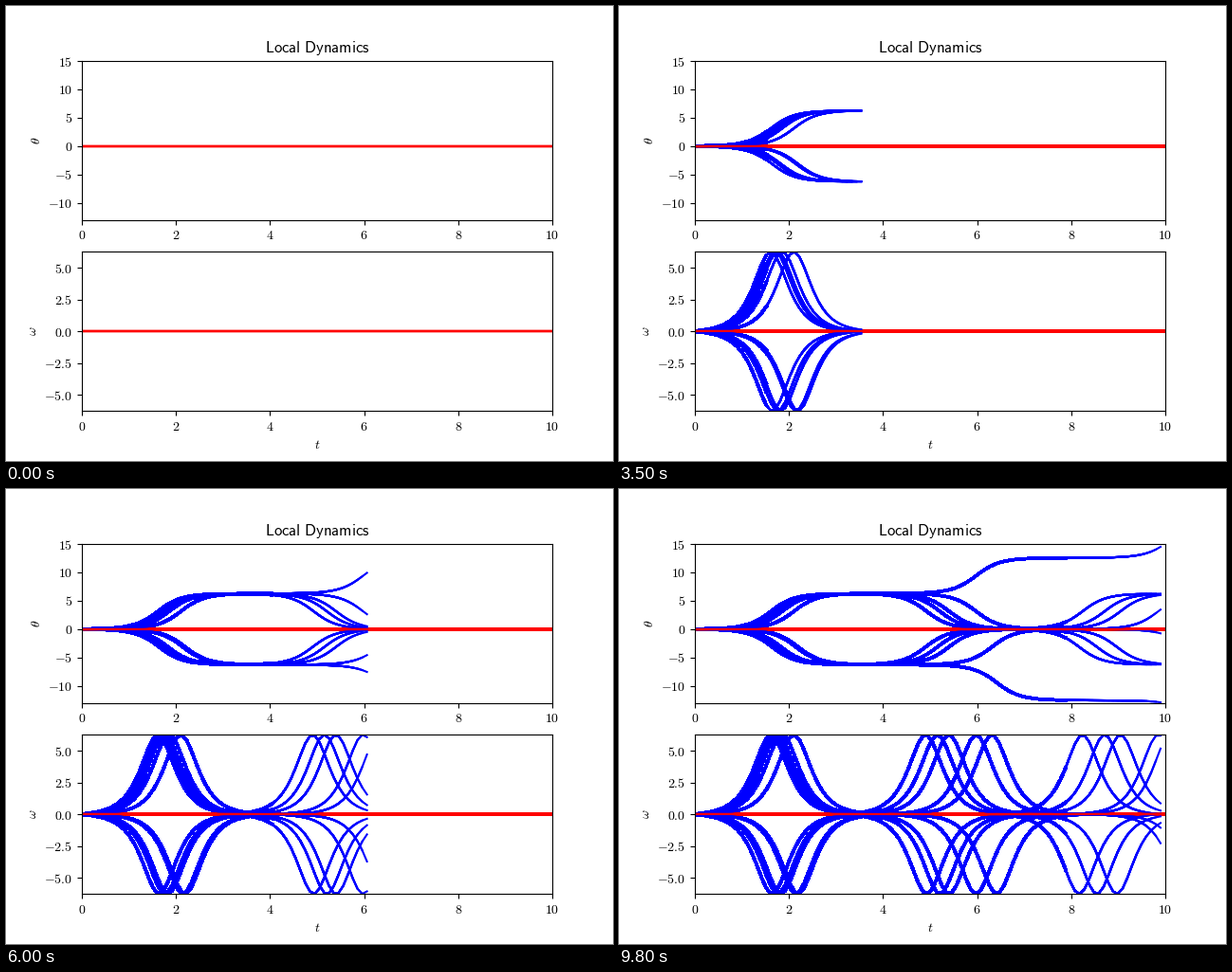
Write a matplotlib script that moves like this. It is 640 by 480 pixels and loops after 9.9 s.

```python
import numpy as np
import matplotlib.pyplot as plt
from matplotlib.animation import FuncAnimation
from matplotlib.collections import LineCollection

plt.rcParams["mathtext.fontset"] = "cm"

FRAMES = 99
RATE = np.sqrt(9.8)      # growth rate at the upright position
DEPTH = 20               # how many overlaid passes are drawn one by one
T = np.linspace(0, 10, FRAMES + 1)

# Pendulums near the top: side, first swing time, second swing time, full turns?
SWINGS = [
    (1, 1.615, 4.928, False),
    (1, 1.704, 5.207, False),
    (1, 1.762, 5.405, False),
    (1, 1.857, 5.980, True),
    (1, 2.105, 5.978, False),
    (-1, 1.643, 4.906, False),
    (-1, 1.763, 5.155, False),
    (-1, 1.831, 5.401, False),
    (-1, 2.147, 6.417, True),
    (-1, 2.195, 6.314, False),
]


def motion(side, first, second, turning):
    """Angle and speed as a chain of fast swings between upright rests."""
    period = second - first
    theta = np.zeros_like(T)
    omega = np.zeros_like(T)
    for n in range(-1, 4):
        sign = side if turning or n % 2 == 0 else -side
        phase = RATE * (T - first - n * period)
        theta += sign * 4 * np.arctan(np.exp(phase))
        omega += sign * 2 * RATE / np.cosh(phase)
        if n < 0:
            theta -= sign * 2 * np.pi
    return np.column_stack([T, theta]), np.column_stack([T, omega])


def setup(ax, limits, ticks, name):
    ax.set_xlim(0, 10)
    ax.set_ylim(*limits)
    xticks = range(0, 11, 2)
    ax.set_xticks(xticks, [f"${v}$" for v in xticks])
    ax.set_yticks(ticks, [f"${v}$" for v in ticks])
    ax.set_ylabel(name)
    lines = LineCollection([], capstyle="projecting", joinstyle="round")
    return ax.add_collection(lines, autolim=False)


def overlay(lines, curves, i):
    """Every pass repaints all curves up to its own end, each followed by the rest line."""
    rest = np.array([[0, 0], [10, 0]])
    parts = []
    # older passes have built up into solid, slightly wider strokes
    if i > DEPTH:
        parts += [(c[:i - DEPTH + 1], "blue", 2.1, False) for c in curves]
    for end in range(max(0, i - DEPTH + 1), i + 1):
        for c in curves:
            if end:
                parts.append((c[:end + 1], "blue", 1.5, True))
            parts.append((rest, "red", 1.5, True))
    segments, colors, widths, smooth = zip(*parts)
    lines.set_segments(segments)
    lines.set_color(colors)
    lines.set_linewidth(widths)
    lines.set_antialiased(smooth)


angles, speeds = zip(*(motion(*s) for s in SWINGS))

fig, (top, bottom) = plt.subplots(2, 1, figsize=(6.4, 4.8), dpi=100)
top.set_title(r"$\mathsf{Local\ Dynamics}$")
bottom.set_xlabel("$t$")
angle_lines = setup(top, (-13.0, 15.08), range(-10, 16, 5), r"$\theta$")
speed_lines = setup(bottom, (-6.26, 6.26), [-5.0, -2.5, 0.0, 2.5, 5.0], r"$\omega$")


def update(i):
    overlay(angle_lines, angles, i)
    overlay(speed_lines, speeds, i)
    return angle_lines, speed_lines


anim = FuncAnimation(fig, update, frames=FRAMES, interval=100,
                     repeat=True, repeat_delay=0, blit=False)
plt.show()
```
